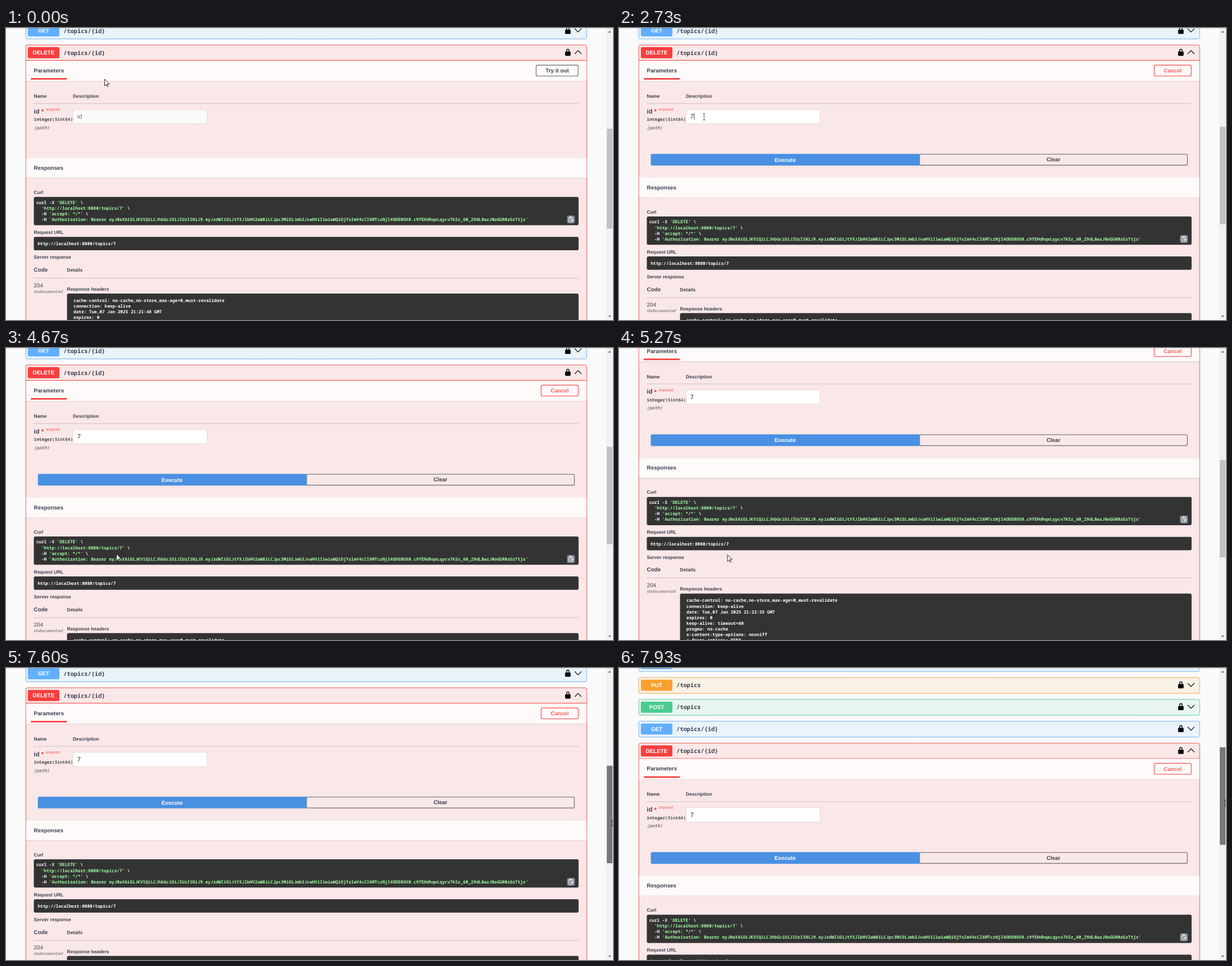
An HTML page with a canvas that plays this animation: 1080x519 px, repeating every 8 s.

```html
<!DOCTYPE html>
<html lang="en">
<head>
<meta charset="utf-8">
<title>API console</title>
<style>
  html, body { margin: 0; width: 100%; height: 100%; overflow: hidden; background: #fafafa; }
  canvas { display: block; width: 1080px; height: 519px; }
</style>
</head>
<body>
<canvas id="stage" width="1080" height="519"></canvas>
<script>
const ctx = document.getElementById('stage').getContext('2d');
ctx.textRendering = 'geometricPrecision';

const LOOP = 8000, STEP = 1000 / 15, ZOOM = 0.703;
const TRY_AT = 1530, FOCUS_AT = 2400, TYPE_AT = 2730, BLUR_AT = 3700, RESPONSE_AT = 4000, DRAG_AT = 7390;
const SANS = '"Liberation Sans", Arial, sans-serif';
const MONO = '"Noto Sans Mono", "DejaVu Sans Mono", monospace';
const INK = '#3b4151', RED = '#f93e3e', DARK = '#333', GREEN = '#a2fca2', CANCEL = '#ff6060';
const SMALL = 8.44, BODY = 9.84, LARGE = 11.25;
const CODE = 7.73, PATH = 10.31, NOTE = 7.08;
const BLOCK_TOP = 30.2, ROW_H = 28, ROW_PITCH = 38.9, EXTRA = 34.7;

const TOKEN = 'eyJ0eXAiOiJKV1QiLCJhbGciOiJIUzI1NiJ9' +
  '.eyJzdWIiOiJtYXJlbHV2aW8iLCJpc3MiOiJmb3JvaHViIiwiaWQiOjYsImV4cCI6MTczNjI4ODE0OX0' +
  '.c9fEHdhqeLqycv7kSr_60_29dL8wzJNoGGR0zGzTtjs';

const METHODS = {
  GET: ['#61affe', '#ebf3fa'],
  POST: ['#49cc90', '#e8f5ef'],
  PUT: ['#fca130', '#faf1e6'],
  DELETE: [RED, '#fae7e7'],
};

// Keys: time, then one value per axis.
const POINTER = [
  [0, 175.5, 91], [67, 175.5, 91], [733, 329, 171], [933, 329, 171], [1467, 947, 71], [1533, 947, 71],
  [1800, 920, 107], [2400, 150, 157], [2667, 150, 157], [3733, 272, 228], [3867, 272, 228],
  [4667, 196.5, 366], [5200, 196.5, 366], [5933, 50, 421], [6000, 50, 421], [6400, 110, 433],
  [6800, 254, 375], [6933, 321, 367], [7333, 1078.5, 292], [7400, 1078.5, 294],
  [7733, 1078.5, 249.5], [7933, 1078.5, 234], [8000, 1078.5, 231],
];
const SCROLL = [[0, 0], [4867, 0], [5067, -70.3], [7400, -70.3], [7733, 65], [7933, 103.4], [8000, 115]];

// Monotone cubic interpolation: smooth through keys, still on plateaus.
function track(keys, t, axis) {
  const slope = i => i < 0 || i >= keys.length - 1 ? 0
    : (keys[i + 1][axis] - keys[i][axis]) / (keys[i + 1][0] - keys[i][0]);
  const tangent = i => {
    const a = slope(i - 1), b = slope(i);
    return a * b > 0 ? 2 * a * b / (a + b) : 0;
  };
  let i = 0;
  while (i < keys.length - 2 && t >= keys[i + 1][0]) i++;
  const [a, b] = [keys[i], keys[i + 1]];
  const span = b[0] - a[0], u = (t - a[0]) / span, v = 1 - u;
  return v * v * (1 + 2 * u) * a[axis] + u * u * (3 - 2 * u) * b[axis]
    + span * u * v * (v * tangent(i) - u * tangent(i + 1));
}

function text(str, x, midY, size, { color = INK, style = 'bold', font = SANS, align = 'left' } = {}) {
  ctx.font = `${style} ${size}px ${font}`;
  ctx.fillStyle = color;
  ctx.textAlign = align;
  ctx.fillText(str, x, midY + size * 0.36);
  return x + ctx.measureText(str).width;
}
const code = (str, x, midY, color = '#fff') => text(str, x, midY, CODE, { color, font: MONO });

function rect(x, y, w, h, fill, radius = 0, stroke, line = 1) {
  ctx.beginPath();
  ctx.roundRect(x, y, w, h, radius);
  if (fill) { ctx.fillStyle = fill; ctx.fill(); }
  if (stroke) { ctx.strokeStyle = stroke; ctx.lineWidth = line; ctx.stroke(); }
}

function shadowed(color, blur, dy, draw) {
  ctx.save();
  ctx.shadowColor = color;
  ctx.shadowBlur = blur;
  ctx.shadowOffsetY = dy;
  draw();
  ctx.restore();
}

function lines(points, { fill, stroke, width = 1, close = false }) {
  ctx.beginPath();
  points.forEach(([x, y]) => ctx.lineTo(x, y));
  if (close) ctx.closePath();
  if (fill) { ctx.fillStyle = fill; ctx.fill(); }
  if (stroke) { ctx.strokeStyle = stroke; ctx.lineWidth = width; ctx.stroke(); }
}

const rule = y => rect(49.5, y, 969.5, 0.8, 'rgba(59,65,81,.3)');

function lock(x, y) {
  rect(x - 4.9, y - 1.3, 9.8, 7.6, '#000', 1.3);
  ctx.beginPath();
  ctx.moveTo(x - 2.1, y - 1);
  ctx.lineTo(x - 2.1, y - 2.9);
  ctx.bezierCurveTo(x - 2.1, y - 6.3, x + 2.1, y - 6.3, x + 2.1, y - 2.9);
  ctx.lineTo(x + 2.1, y - 1);
  ctx.strokeStyle = '#000';
  ctx.lineWidth = 1.4;
  ctx.stroke();
}

function row(method, path, y, height = ROW_H, open = false) {
  const [main, tint] = METHODS[method], mid = y + 13.4, dir = open ? 1 : -1;
  shadowed('rgba(0,0,0,.19)', 2.2, 0, () => rect(35.3, y, 997.8, height, tint, 2.8));
  rect(35.3, y, 997.8, height, null, 2.8, main, 0.8);
  rect(38.8, y + 3.9, 56.2, 19.7, main, 2.1);
  text(method, 67, mid, BODY, { color: '#fff', align: 'center' });
  text(path, 102.3, mid + 0.3, PATH, { font: MONO });
  lock(999.7, mid - 0.5);
  lines([[1011.8, mid - 0.5 + 3 * dir], [1017.8, mid - 0.5 - 3 * dir], [1023.8, mid - 0.5 + 3 * dir]],
    { stroke: '#000', width: 1.2 });
}

function sectionHead(title, y, height) {
  shadowed('rgba(0,0,0,.2)', 1.6, 0.8, () => rect(35.8, y, 996.8, height, '#fefafa'));
  text(title, 49.6, y + 17.4, BODY);
}

function button(label, x, y, w, h, border, color) {
  rect(x + 0.7, y + 0.7, w - 1.4, h - 1.4, null, 2.4, border, 1.4);
  text(label, x + w / 2, y + h / 2 - 0.2, BODY, { color, align: 'center' });
}

function mix(from, to, u) {
  return `rgb(${from.map((c, i) => Math.round(c + (to[i] - c) * u)).join()})`;
}

function parameters(t, overExecute) {
  const active = t >= TRY_AT;
  sectionHead('Parameters', 58, 36);
  rect(44.2, 89, 64, 2.7, RED);
  if (active) {
    const u = Math.min(1, Math.max(0, (t - 1535) / 250)), red = [255, 96, 96];
    button('Cancel', 951.5, 65.3, 67.3, 20.8, mix([128, 128, 128], red, u), mix([59, 65, 81], red, u));
  } else {
    button('Try it out', 942.6, 65.3, 76.2, 20.8, 'gray', INK);
  }

  text('Name', 49.6, 121, SMALL);
  text('Description', 119, 121, SMALL);
  rule(133.7);
  text('id', 49.6, 147.5, LARGE);
  text('*', 62.5, 148.3, LARGE, { color: '#f22' });
  text('required', 70.5, 144.5, 7.03, { color: '#fb5353', style: '' });
  const formatX = code('integer', 49.6, 162.5, INK);
  code('($int64)', formatX, 162.5, '#505460');
  text('(path)', 49.6, 177, CODE, { color: '#777', style: 'italic 600', font: MONO });

  rect(119.3, 145, 238.5, 25, active ? '#fff' : '#fafafa', 2.6, '#dcd6d6', 0.8);
  if (t >= TYPE_AT) text('7', 126.7, 157, LARGE, { color: '#222', style: '' });
  else text('id', 126.7, 157, LARGE, { color: '#6f7680', style: '' });
  if (t >= FOCUS_AT && t < BLUR_AT && (t - FOCUS_AT) % 1000 < 500) {
    rect(t < TYPE_AT ? 126.3 : 133.6, 151, 0.8, 12, '#222');
  }

  if (!active) return;
  button('Clear', 534, 223.7, 478, 20.8, 'gray', INK);
  const face = () => rect(56.6, 223.7, 478.2, 20.8, '#4990e2', [2.8, 0, 0, 2.8]);
  if (overExecute) shadowed('rgba(0,0,0,.4)', 4, 0, face);
  else face();
  text('Execute', 295.5, 234, BODY, { color: '#fff', align: 'center' });
}

function copyIcon(x, y) {
  rect(x, y, 14, 14, '#7d8293', 2.8);
  rect(x + 3, y + 3.2, 7.4, 8, null, 0.8, '#fff', 1);
  rect(x + 4.8, y + 2, 3.8, 2.2, '#fff', 0.6);
  rect(x + 4.5, y + 5.5, 3, 0.8, '#fff');
  lines([[x + 9, y + 6], [x + 6.5, y + 8], [x + 9, y + 10]], { stroke: '#fff', width: 0.9 });
  lines([[x + 6.5, y + 8], [x + 12, y + 8]], { stroke: '#fff', width: 0.9 });
}

function responses(t) {
  sectionHead('Responses', 231, 35.5);
  text('Curl', 49.6, 292, SMALL);
  rect(49.5, 300.3, 969.3, 50.2, DARK, 2.8);
  [
    ['curl -X ', "'DELETE'", ' \\'],
    ['  ', "'http://localhost:8080/topics/7'", ' \\'],
    ['  -H ', "'accept: */*'", ' \\'],
    ['  -H ', `'Authorization: Bearer ${TOKEN}'`, ''],
  ].forEach((parts, i) => parts.reduce(
    (x, part, k) => code(part, x, 310 + i * 10.1, k === 1 ? GREEN : '#fff'), 53.7));
  copyIcon(998.2, 333.3);

  text('Request URL', 49.6, 363, SMALL);
  rect(49.5, 371.3, 969.3, 23.8, DARK, 2.8);
  code('http://localhost:8080/topics/7', 56.4, 383.5);

  text('Server response', 49.6, 407.4, SMALL);
  text('Code', 49.6, 429.5, BODY);
  text('Details', 108.6, 430, SMALL);
  rule(444);
  text('204', 49.6, 457, BODY, { style: '' });
  text('Undocumented', 49.6, 468, NOTE, { color: '#8f8a8c', style: 'italic 600', font: MONO });
  text('Response headers', 108.6, 464, SMALL);
  rect(108.6, 472, 910.2, 106, DARK, 2.8);
  [
    'cache-control: no-cache,no-store,max-age=0,must-revalidate',
    'connection: keep-alive',
    `date: Tue,07 Jan 2025 ${t < RESPONSE_AT ? '21:21:48' : '21:22:55'} GMT`,
    'expires: 0',
    'keep-alive: timeout=60',
    'pragma: no-cache',
    'x-content-type-options: nosniff',
    'x-frame-options: DENY',
    'x-xss-protection: 0',
  ].forEach((line, i) => code(line, 120, 484.3 + i * 10.1));
}

function scrollbar(t, scroll) {
  rect(1068, 0, 12, 519, '#f1f1f1');
  const active = t >= TRY_AT;
  rect(1069, active ? 175.5 - scroll / 3 : 179, 10, active ? 173.2 : 177.5, t >= DRAG_AT ? '#787878' : '#c1c1c1');
  for (const [y, dir] of [[6.7, -1], [512.5, 1]]) {
    lines([[1071.5, y - dir * 1.3], [1076.5, y - dir * 1.3], [1074, y + dir * 1.5]], { fill: '#505050', close: true });
  }
}

const SHAPES = {
  arrow: [[0, 0], [0, 17], [4, 13.3], [6.8, 19], [9, 18], [6.4, 12.2], [11.8, 12]],
  hand: [[-1.5, 1], [0, 0], [1.5, 1], [1.5, 6.5], [4, 6.7], [6.5, 7.5], [9, 8.5], [10, 10], [10, 14.5],
    [8, 18], [8, 20.5], [-.5, 20.5], [-.5, 18.5], [-5.5, 12], [-5.5, 10.5], [-4, 10], [-1.5, 12]],
};

function pointer(kind, x, y) {
  ctx.save();
  ctx.translate(x, y);
  ctx.scale(ZOOM, ZOOM);
  if (kind === 'beam') {
    lines([[-3, -8], [3, -8]], { stroke: '#222' });
    lines([[0, -8], [0, 8]], { stroke: '#222' });
    lines([[-3, 8], [3, 8]], { stroke: '#222' });
  } else {
    ctx.lineJoin = 'round';
    lines(SHAPES[kind], { fill: '#fff', stroke: '#000', width: 1.2, close: true });
  }
  ctx.restore();
}

function render(time) {
  const t = Math.floor((time + 4) / STEP) * STEP;
  const scroll = track(SCROLL, t, 1);
  const x = track(POINTER, t, 1), y = track(POINTER, t, 2);
  const active = t >= TRY_AT;
  const over = (left, top, right, bottom) =>
    x >= left && x <= right && y - scroll >= top && y - scroll <= bottom;
  const overExecute = active && over(56.6, 223.7, 534.5, 244.5);
  const overButton = overExecute || over(active ? 951.5 : 942.6, 65.3, 1018.8, 86);
  const kind = overButton ? 'hand' : over(119, 145, 358, 170) ? 'beam' : 'arrow';

  rect(0, 0, 1080, 519, '#fafafa');
  ctx.save();
  ctx.translate(0, scroll);
  [['GET', '/topics/{id}'], ['POST', '/topics'], ['PUT', '/topics'], ['GET', '/topics']]
    .forEach(([method, path], i) => row(method, path, BLOCK_TOP - ROW_PITCH * (i + 1)));
  row('DELETE', '/topics/{id}', BLOCK_TOP, 900, true);
  rect(35.3, 57.1, 997.8, 0.8, RED);
  parameters(t, overExecute);
  if (active) ctx.translate(0, EXTRA);
  responses(t);
  ctx.restore();

  scrollbar(t, scroll);
  rect(0, 0, 1080, 1, 'rgba(0,0,0,.1)');
  pointer(kind, x, y);
}

const start = performance.now();
function frame() {
  render((performance.now() - start) % LOOP);
  requestAnimationFrame(frame);
}
frame();
</script>
</body>
</html>
```
